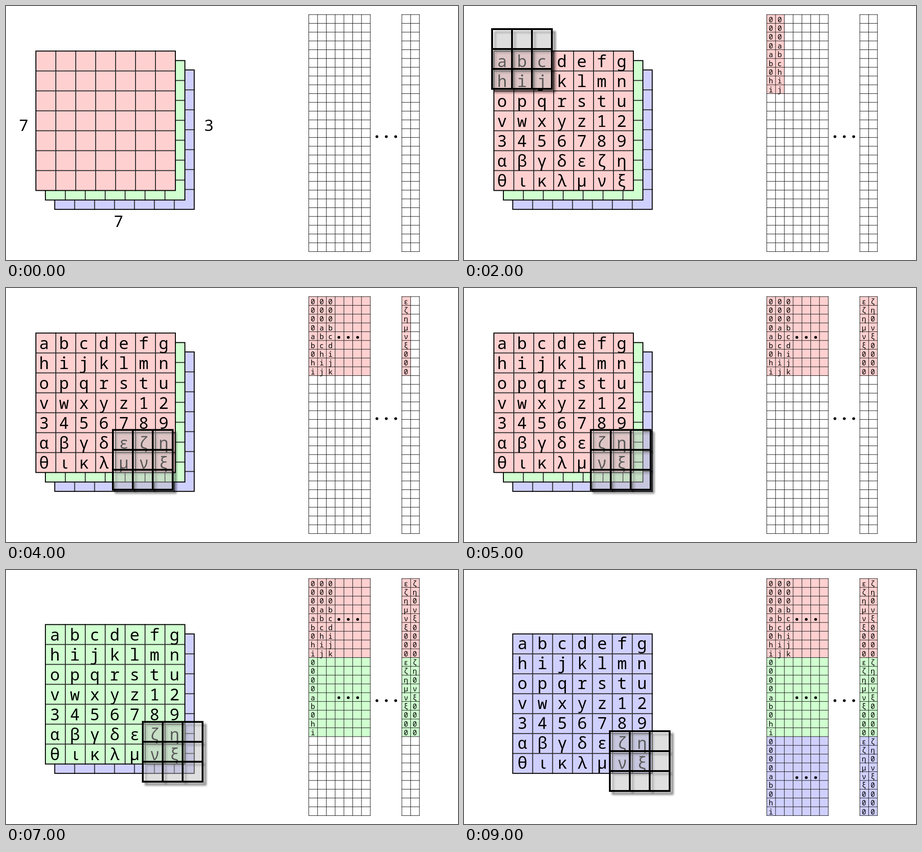
Write an HTML page that moves like this. It is 998 px wide and 561 px high and loops after 10 s.

```html
<!DOCTYPE html>
<html lang="en">
<head>
<meta charset="utf-8">
<title>Patches to columns</title>
<style>
  html, body { margin: 0; width: 100%; height: 100%; overflow: hidden; background: #fff; }
  svg { display: block; width: 998px; height: 561px; }
  text { text-anchor: middle; font-family: "Noto Sans Mono", monospace; }
  .big { font-size: 36px; }
  .small { font-size: 16px; }
  .label { font: 35px "Noto Sans", sans-serif; }
  .scene { visibility: hidden; animation: show 10s step-end infinite; }
  @keyframes show {
    0% { visibility: visible; }
    10%, 100% { visibility: hidden; }
  }
</style>
</head>
<body>
<svg id="stage" viewBox="0 0 998 561">
  <defs>
    <filter id="shadow" x="-10%" y="-10%" width="130%" height="130%" color-interpolation-filters="sRGB">
      <feDropShadow dx="6.5" dy="6.5" stdDeviation="2" flood-color="#000" flood-opacity=".5"/>
    </filter>
  </defs>
</svg>
<script>
const LETTERS = [...'abcdefghijklmnopqrstuvwxyz123456789αβγδεζηθικλμνξ'];
const CELL = 44;
const ROW = 19.385, COL = 19.4, TOP = 19, LEFT = 668.5, RIGHT = 874;

// dx, dy: offset of the letters inside a cell
const LAYERS = [
  { x: 66, y: 99.5, color: '#ffd0d0', dx: 18, dy: 35, dots: 109 },
  { x: 87, y: 120.5, color: '#d0ffd0', dx: 21, dy: 35, dots: 282 },
  { x: 107.6, y: 141.2, color: '#d0d0ff', dx: 21.5, dy: 34, dots: 458.5 },
];

// kernel: line position; at: [column, row] of the patches filled in per layer
const SCENES = [
  { top: 0, cols: [0, 0, 0], ends: [0, 0, 0] },
  { top: 0, kernel: [18, 51], cols: [1, 0, 0], ends: [0, 0, 0], arrow: true },
  { top: 0, kernel: [62, 51], cols: [2, 0, 0], ends: [0, 0, 0] },
  { top: 0, kernel: [106, 51], cols: [3, 0, 0], ends: [0, 0, 0] },
  { top: 0, kernel: [236, 313.5], cols: [3, 0, 0], ends: [1, 0, 0] },
  { top: 0, kernel: [280, 313.5], cols: [3, 0, 0], ends: [2, 0, 0] },
  { top: 1, kernel: [38, 72], cols: [3, 1, 0], ends: [2, 0, 0] },
  { top: 1, kernel: [302, 335.5], cols: [3, 1, 0], ends: [2, 2, 0] },
  { top: 2, kernel: [59, 94], cols: [3, 1, 1], ends: [2, 2, 0] },
  { top: 2, kernel: [322, 356], cols: [3, 1, 1], ends: [2, 2, 2] },
];

const range = n => [...Array(n).keys()];
const text = (cls, x, y, s) => `<text class="${cls}" x="${x}" y="${y}">${s}</text>`;
const rect = (x, y, w, h, attrs) => `<rect x="${x}" y="${y}" width="${w}" height="${h}" ${attrs}/>`;
const dots = (x, y) => range(3).map(i => `<circle cx="${x + i * 20.7}" cy="${y}" r="3.1"/>`).join('');

// Lines of a grid; edge = 1 leaves the outer lines out
function grid(x, y, cols, rows, w, h, attrs, edge = 0) {
  const inner = n => range(n + 1).slice(edge, n + 1 - edge);
  const d = inner(cols).map(i => `M${x + i * w} ${y}v${rows * h}`).join('') +
            inner(rows).map(i => `M${x} ${y + i * h}h${cols * w}`).join('');
  return `<path d="${d}" fill="none" stroke-linecap="square" ${attrs}/>`;
}

function layer({ x, y, color, dx, dy }, letters) {
  const size = 7 * CELL;
  return rect(x, y, size, size, `fill="${color}"`) +
    grid(x, y, 7, 7, CELL, CELL, 'stroke="#2c2c2c" stroke-width="2"', 1) +
    rect(x, y, size, size, 'fill="none" stroke="#000" stroke-width="2.1"') +
    (letters ? LETTERS.map((s, i) =>
      text('big', x + i % 7 * CELL + dx, y + Math.floor(i / 7) * CELL + dy, s)).join('') : '');
}

// The nine values around a cell, zero padded
function patch(col, row) {
  return range(9).map(i => {
    const c = col + i % 3 - 1, r = row + Math.floor(i / 3) - 1;
    return c < 0 || r < 0 || c > 6 || r > 6 ? '0' : LETTERS[r * 7 + c];
  });
}

function column(x, y, values) {
  return values.map((s, i) => text('small', x + COL / 2 - .6, y + i * ROW + 16.6, s)).join('');
}

function matrix({ cols, ends }) {
  let fills = '', marks = '';
  LAYERS.forEach(({ color, dots: dotY }, k) => {
    const y = TOP + 9 * k * ROW, full = ends[k] > 0;
    const fill = (x, n) => rect(x, y, n * COL, 9 * ROW, `fill="${color}"`);
    fills += fill(LEFT, full ? 7 : cols[k]) + fill(RIGHT, ends[k]);
    range(cols[k]).forEach(i => marks += column(LEFT + i * COL, y, patch(i, 0)));
    range(ends[k]).forEach(i => marks += column(RIGHT + i * COL, y, patch(5 + i, 6)));
    if (full) marks += dots(735, dotY);
  });
  const line = 'stroke="#111" stroke-width="1"';
  return fills + grid(LEFT, TOP, 7, 27, COL, ROW, line) +
    grid(RIGHT, TOP, 2, 27, COL, ROW, line) + marks + dots(819, 288.5);
}

function kernel([x, y]) {
  return `<g filter="url(#shadow)">` +
    rect(x, y, 3 * CELL, 3 * CELL, 'fill="#f5f5f5" fill-opacity=".36"') +
    grid(x, y, 3, 3, CELL, CELL, 'stroke="#000" stroke-width="4"') + '</g>';
}

const ARROW = `<path d="M169 54C185 46 198 50 222 49C270 46 335 21 415 20.5C490 20.5 520 61 585 61C600 61 606 58 622 58"
  fill="none" stroke="#000" stroke-width="3"/><path d="M641.5 58.5L614.5 43.5L621 58.5L615 74Z"/>`;

const LABELS = text('label', 39, 276, 7) + text('label', 248.5, 488, 7) + text('label', 448, 276, 3);

function scene(s, i) {
  const stack = range(3).filter(k => k >= s.top).reverse()
    .map(k => layer(LAYERS[k], k === s.top && i > 0)).join('');
  return `<g class="scene" style="animation-delay:${i - 10}s">` + stack + matrix(s) +
    (s.kernel ? kernel(s.kernel) : LABELS) + (s.arrow ? ARROW : '') + '</g>';
}

document.getElementById('stage').insertAdjacentHTML('beforeend', SCENES.map(scene).join(''));
</script>
</body>
</html>
```
